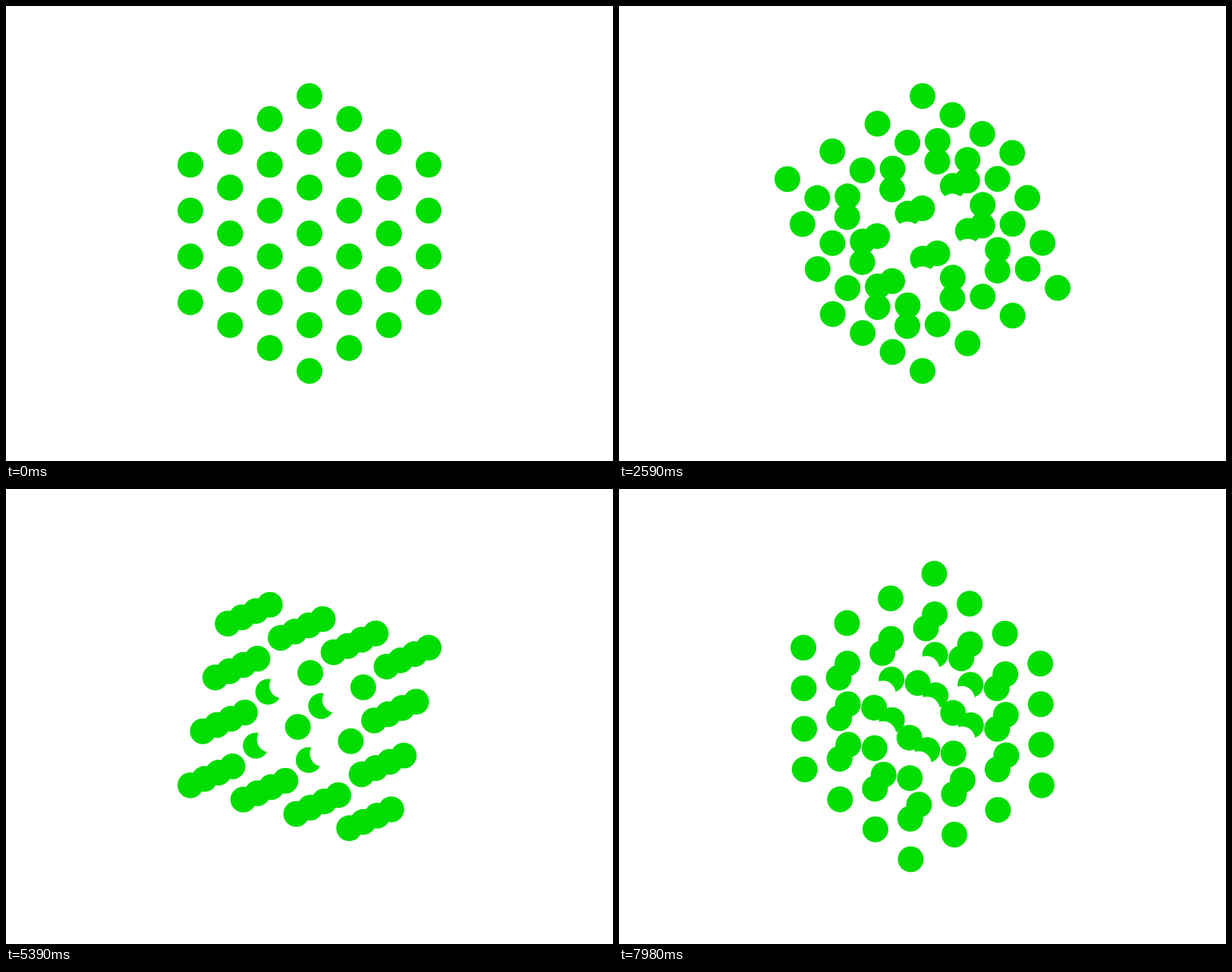
Write an HTML page with a canvas that moves like this. It is 800 by 600 pixels and loops after 8000 ms.

```html
<!DOCTYPE html>
<html lang="en">
<head>
<meta charset="utf-8">
<title>Turning lattice</title>
<style>
  html, body { margin: 0; width: 100%; height: 100%; overflow: hidden; background: #fff; }
  canvas { display: block; }
</style>
</head>
<body>
<canvas id="stage" width="800" height="600"></canvas>
<script>
const ctx = document.getElementById('stage').getContext('2d');
const LOOP = 8000, TURN = 3610, STEPS = 120;
const GAP = 74, RADIUS = 17;
const GREEN = '#00dd00', WHITE = '#ffffff';
const rad = deg => deg * Math.PI / 180;

// Unit vector whose screen direction is `deg`, with depth z (y up, z to the viewer)
function direction(deg, z) {
  const flat = Math.sqrt(1 - z * z);
  return [flat * Math.cos(rad(deg)), flat * Math.sin(rad(deg)), z];
}

// 4x4x4 lattice seen along a body diagonal; its inner 2x2x2 is white
const edges = [90, 210, 330].map(deg => direction(deg, 1 / Math.sqrt(3)));
const offsets = [-1.5, -0.5, 0.5, 1.5];
const dots = [];
for (const a of offsets) for (const b of offsets) for (const c of offsets) {
  const inner = [a, b, c].every(v => Math.abs(v) < 1);
  dots.push({
    pos: [0, 1, 2].map(i => GAP * (a * edges[0][i] + b * edges[1][i] + c * edges[2][i])),
    color: inner ? WHITE : GREEN
  });
}

const ease = u => u < 0.5 ? 2 * u * u : 1 - 2 * (1 - u) * (1 - u);

function rotate([x, y, z], [ax, ay, az], angle) {
  const c = Math.cos(angle), s = Math.sin(angle);
  const k = (ax * x + ay * y + az * z) * (1 - c);
  return [
    x * c + (ay * z - az * y) * s + ax * k,
    y * c + (az * x - ax * z) * s + ay * k,
    z * c + (ax * y - ay * x) * s + az * k
  ];
}

function draw(time) {
  // Each turn has 120 steps of 30 ms, the first held 10 ms longer
  const turn = Math.floor(time / TURN);
  const step = Math.max(0, Math.floor((time % TURN - 10) / 30));
  const sign = turn % 2 ? -1 : 1;
  const axis = direction(90 - 60 * turn, -sign / 3);
  const angle = sign * rad(120) * ease(step / STEPS);

  ctx.fillStyle = WHITE;
  ctx.fillRect(0, 0, 800, 600);
  dots
    .map(d => ({ p: rotate(d.pos, axis, angle), color: d.color }))
    .sort((m, n) => m.p[2] - n.p[2])
    .forEach(({ p, color }) => {
      ctx.fillStyle = color;
      ctx.beginPath();
      ctx.arc(400 + p[0], 300 - p[1], RADIUS, 0, 2 * Math.PI);
      ctx.fill();
    });
}

const start = performance.now();
function tick() {
  draw((performance.now() - start) % LOOP);
  requestAnimationFrame(tick);
}
tick();
</script>
</body>
</html>
```
